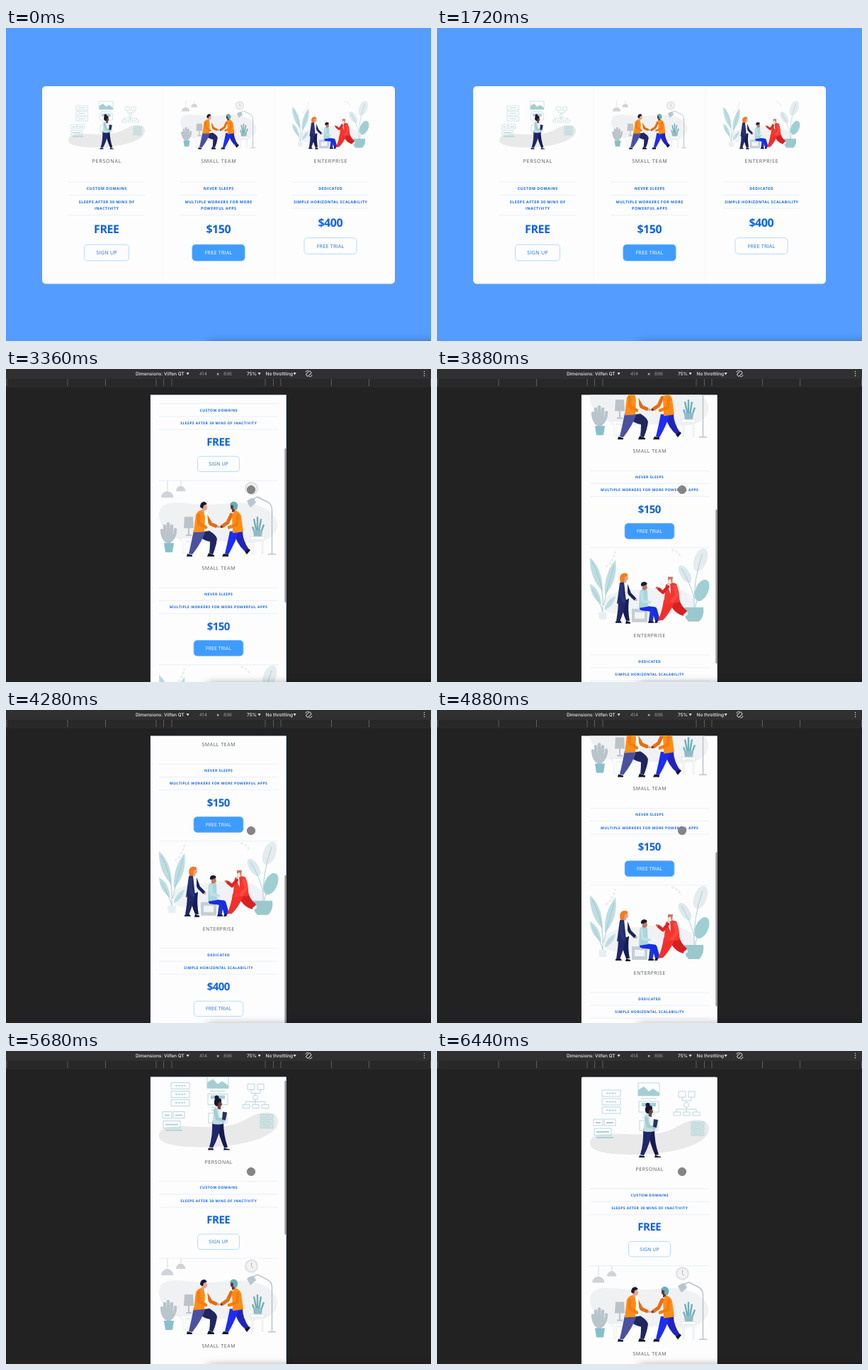
These frames come from a looping animation (600 px wide and 441 px high, 6480 ms). An HTML page:

```html
<!DOCTYPE html>
<html lang="en">
<head>
<meta charset="utf-8">
<title>Responsive pricing plans</title>
<style>
  html, body { margin: 0; width: 100%; height: 100%; overflow: hidden; }
  svg { display: block; width: 600px; height: 441px; }
  text { font-family: "Open Sans", sans-serif; text-rendering: geometricPrecision; }
  .bar text { font-family: Inter, sans-serif; font-size: 6.5px; font-weight: 500; fill: #eee; }
  .bar .dim { fill: #9a9a9a; font-weight: 400; }
  .limb { fill: none; stroke-linecap: round; stroke-linejoin: round; }
  .wire { fill: none; stroke: #a9cfd3; stroke-width: .8; }
</style>
</head>
<body>
<svg viewBox="0 0 600 441">
  <defs>
    <clipPath id="screen"><rect x="203.800" y="36.500" width="192" height="405"/></clipPath>
    <filter id="blur" x="-20%" y="-200%" width="140%" height="500%"><feGaussianBlur stdDeviation="7"/></filter>

    <g id="art0">
      <path fill="#e9e9ea" d="M0 87C0 72 24 73 50 74C88 76 108 73 126 62C145 50 168 51 168 67C168 90 112 103 62 103C26 103 0 99 0 87"/>
      <g class="wire">
        <path d="M17 12h26v9h-26zM17 24h26v9h-26zM17 36h26v9h-26z"/>
        <path d="M23 16.500h14M23 28.500h14M23 40.500h14" stroke-width="1.600" stroke-dasharray="3 1"/>
        <path d="M68 2h30v18h-30zM69 28h28v15h-28zM70 55h26v14h-26zM72 24h22M74 47h18M74 50h12"/>
        <path d="M125 14h10v8h-10zM139 14h9v8h-9zM130 22v5h13v-5M136 27v3M122 43v-4h28v4M136 36v7"/>
        <circle cx="136" cy="33" r="3.500"/>
        <path d="M118 43h10v5h-10zM132 43h9v5h-9zM145 43h10v5h-10z"/>
        <path d="M5 53h13v9h-13zM20 53h16v9h-16zM6 66h24v10h-24z"/>
        <path d="M8 58h7M23 58h10M9 71h18M9 79h24" stroke-width="1.800"/>
        <path d="M143 57h18v5h-18zM143 64h18v5h-18zM143 71h18v5h-18z" fill="#d4e6e6"/>
        <path d="M146 59.500h12M146 66.500h12M146 73.500h12"/>
      </g>
      <path fill="#a4ced3" d="M68 20v-8l8-5 7 7 6-4 9 6v4zM73 30h20v5h-20z"/>
      <path fill="#151b4c" d="M80 67h11Q91 86 97 103l-5 1Q85 88 80 67"/>
      <path fill="#1e2769" d="M75 67h13Q85 88 76 104l-5-1Q76 86 75 67"/>
      <path fill="#141838" d="M70 104l7 1v2h-8zM92 104l8 2v1h-9z"/>
      <path fill="#bfdde1" d="M78 48Q83 44 88 48L91 70Q83 72 75 70z"/>
      <path fill="#e9f3f3" d="M83 46l5 1 3 17-6-2z"/>
      <path class="limb" stroke="#a5ccd3" stroke-width="4.500" d="M79 51L82 63 92 65"/>
      <path fill="#2a315e" d="M90 53l6 1-2 11-5-1z"/>
      <path fill="#6b4038" d="M82 39h6l1 4-2 3v4l-4-1z"/>
      <path fill="#171830" d="M78 41Q77 33 84 34Q89 34 88 39L84 40 83 45Q79 46 78 41"/>
      <circle cx="81.500" cy="33" r="3" fill="#171830"/>
    </g>

    <g id="art1">
      <path fill="#f0f1f3" d="M1 42C6 26 34 32 60 34C100 34 121 27 142 36C177 49 173 78 145 86C110 92 90 81 62 88C26 92-6 65 1 42"/>
      <path fill="none" stroke="#cdd1d5" stroke-width=".8" d="M12 0v15M31 0v7"/>
      <path fill="#d0d4d8" d="M3 24a8.700 9 0 0 1 17.400 0zM24 15a6.700 7.500 0 0 1 13.400 0z"/>
      <circle cx="130.500" cy="11" r="9.500" fill="#e1e2e4"/>
      <circle cx="130.500" cy="11" r="7" fill="#f3f3f4"/>
      <path stroke="#9ba0a6" stroke-width=".8" fill="none" d="M130.500 6v5l2 3"/>
      <path fill="none" stroke="#b9c2c9" stroke-width="1.500" d="M159.500 104V42Q160 34 153 30L139 23 132 27"/>
      <path fill="#b9c6ce" d="M124 29q5-5 10-4l3 6-8 7zM154 103h11v1.500h-11z"/>
      <path fill="none" stroke="#b9c4cb" stroke-width="4.500" stroke-linecap="round" d="M13 88V61M12 86Q5 83 4 70M15 86Q23 80 23 69M9 82L8 64M17 80L18 64"/>
      <path fill="#87bfca" d="M7 88h14l-2 13h-10z"/>
      <path fill="#bbc3c9" d="M36 51h12l1 16h-14zM41 67h2v10h-2zM38 76h8v2h-8z"/>
      <path fill="#fff" stroke="#e4e6e9" stroke-width=".7" d="M31 81h21v4h-4v17h-3v-17h-8v17h-3v-17h-3z"/>
      <path fill="none" stroke="#71aeb8" stroke-width="2.400" d="M139 78L134 54M139 78L139 51M140 78L144 54M137 78L132 65M142 78L148 62"/>
      <path fill="#8fbcc6" d="M133 70h13l-1 9h-11z"/>
      <path fill="#fff" stroke="#dce0e3" stroke-width=".7" d="M129 79h20v4h-2v20h-2v-20h-12v20h-2v-20h-2z"/>

      <path fill="#20265f" d="M55 70L68 69Q81 76 82 82Q81 92 76 104L71 102Q72 94 72 86Q61 84 55 76z"/>
      <path fill="#4a51a0" d="M49 70L66 70Q60 88 47 104L42 103Q46 86 49 70"/>
      <path fill="#11152d" d="M40 103l7 2v2h-8zM70 102l8 3v2h-10z"/>
      <path class="limb" stroke="#e46c11" stroke-width="5" d="M66 49L73 61 80 64"/>
      <path fill="#fff" d="M60 42l8 2 2 27-11 1z"/>
      <path fill="#ff8d17" d="M52 48Q57 40 63 42L65 52 64 72 49 73z"/>
      <path class="limb" stroke="#f47d0c" stroke-width="4.500" d="M56 48L56 60 66 66"/>
      <path fill="#e6a38b" d="M61 34h6l1 5-2 3h-2v3l-4-2z"/>
      <path fill="#151a31" d="M58 36Q59 29 65 30L68 33 63 35 62 39Q58 39 58 36"/>
      <circle cx="84" cy="65" r="1.700" fill="#e6a38b"/>

      <path fill="#2024bc" d="M105 71L118 71Q118 84 127 97L123 101Q110 91 105 71"/>
      <path fill="#1d2df3" d="M100 71L113 71Q107 89 98 104L93 103Q97 87 100 71"/>
      <path fill="#13162c" d="M91 103l7 1v3h-9zM121 100l6-4 2 2-5 6z"/>
      <path fill="#fff" d="M99 43h8l2 29-9-1z"/>
      <path class="limb" stroke="#e96d10" stroke-width="5" d="M102 48L97 59 90 64"/>
      <path fill="#ff8d17" d="M106 42Q113 42 116 50L119 72 104 74 103 51z"/>
      <path class="limb" stroke="#f47d0c" stroke-width="4.500" d="M111 49L110 62 99 66"/>
      <path fill="#603b3a" d="M101 33h7l-1 10-4 2v-4l-2-2z"/>
      <path fill="#68adb5" d="M100 34Q102 28 108 30Q114 34 109 42L105 40V35z"/>
      <circle cx="88" cy="65" r="1.700" fill="#603b3a"/>
    </g>

    <g id="art2">
      <path fill="#f0f2f5" d="M20 83C18 64 39 60 69 59C104 53 142 56 148 76C155 97 121 93 82 93C50 94 21 97 20 83"/>
      <path fill="#bddde2" d="M18 62Q-1 42 0 14Q18 30 18 62M21 67Q19 38 36 17Q40 46 21 67M16 80Q1 70 0 51Q14 58 16 80M20 88Q24 73 36 68Q34 82 20 88"/>
      <path fill="none" stroke="#94c3ca" stroke-width=".8" d="M18 93V70Q16 44 3 20M19 81Q25 54 34 25M18 90Q11 70 3 58"/>
      <path fill="#e6f0f2" d="M12 91h12l-1 10h-10z"/>
      <path fill="none" stroke="#eceff1" stroke-width="3" stroke-dasharray="4 2" d="M22 27Q31 24 36 5M115 3Q123 3 129 14"/>
      <ellipse cx="156" cy="17" rx="9" ry="17" fill="#e4ecee" transform="rotate(20 156 17)"/>
      <ellipse cx="134" cy="37" rx="6.500" ry="14" fill="#dce9ec" transform="rotate(-32 134 37)"/>
      <ellipse cx="158" cy="60" rx="9" ry="16" fill="#9fcfd2" transform="rotate(24 158 60)"/>
      <path fill="none" stroke="#a3cbd0" stroke-width=".9" d="M147 89Q145 46 159 8M148 88Q150 70 162 52M147 72Q142 50 129 29"/>
      <path fill="#9ac8cd" d="M133 84h27Q162 96 154 104h-15Q131 96 133 84"/>
      <path fill="#c5ced4" d="M59 86h22v19h-22z"/>
      <path fill="#f2f4f6" d="M63 91h14v9h-14z"/>

      <path fill="#151c58" d="M44 72h11Q53 88 56 103h-5Q45 90 44 72"/>
      <path fill="#202867" d="M40 72h12Q48 90 42 104h-5Q40 88 40 72"/>
      <path fill="#111630" d="M36 104l7-1 2 3h-9zM51 103l6 2v2h-7z"/>
      <path class="limb" stroke="#1a235f" stroke-width="4.500" d="M51 52L56 65 63 72"/>
      <path fill="#fff" d="M46 47l7 2v24h-5z"/>
      <path fill="#222c6e" d="M42 50Q45 45 48 48L51 76 38 79z"/>
      <path class="limb" stroke="#2b357b" stroke-width="4" d="M45 53L44 67 48 76"/>
      <path fill="#e6a18b" d="M47 39h6l1 5-3 3v3l-5-2z"/>
      <path fill="#f47c20" d="M43 49Q40 38 47 36Q54 35 53 40L49 41 48 49z"/>
      <circle cx="65" cy="73.500" r="1.600" fill="#e6a18b"/>

      <path class="limb" stroke="#2435c6" stroke-width="6" d="M73 85L88 87 86 102"/>
      <path class="limb" stroke="#152ee4" stroke-width="7" d="M74 85L91 87 95 101"/>
      <path fill="#10162d" d="M93 102l6 1v3h-8zM83 103l7 1v2h-8z"/>
      <path fill="#a9d6dc" d="M70 62Q75 55 81 60L82 83 69 85z"/>
      <path class="limb" stroke="#bee1e5" stroke-width="4" d="M73 63L74 75 84 77"/>
      <path fill="#bf7860" d="M74 52h6l1 5-3 3-4-1z"/>
      <path fill="#171a35" d="M72 54Q71 48 77 48Q82 49 80 52L75 54z"/>

      <path fill="#d91f20" d="M111 75L126 72Q128 82 137 89L132 96Q118 93 111 75"/>
      <path fill="#f22f2b" d="M104 74L120 75Q113 93 101 104L96 102Q102 90 104 74"/>
      <path fill="#fff" d="M96 103l6-1 1 4h-8zM132 94l5-4 1 4-5 4z"/>
      <path fill="#f53630" d="M107 52Q115 47 122 51Q127 63 126 77L104 80z"/>
      <path fill="#fff" d="M109 52l4-2 1 15-2-4z"/>
      <path class="limb" stroke="#de2424" stroke-width="4.500" d="M110 55L103 63 97 58"/>
      <path class="limb" stroke="#ff4940" stroke-width="4.500" d="M120 55L123 67 116 75"/>
      <path fill="#c9765d" d="M110 41h7l-1 9-4 2-2-4z"/>
      <path fill="#eee8e3" d="M110 46l4-2 1 6-4 2z"/>
      <circle cx="94.500" cy="56.500" r="1.700" fill="#c9765d"/>
    </g>
  </defs>

  <g id="desktop">
    <rect width="600" height="441" fill="#549cff"/>
    <rect x="51" y="82" width="498" height="278.500" rx="5" fill="#fdfdfe"/>
    <path d="M221 82v278M379 82v278" stroke="#f3f4f7"/>
  </g>

  <g id="mobile">
    <rect width="600" height="441" fill="#222"/>
    <g clip-path="url(#screen)">
      <g id="page">
        <rect x="203.800" y="36.500" width="192" height="797.500" fill="#549cff"/>
        <rect x="203.800" y="36.500" width="192" height="797.500" rx="3" fill="#fdfdfe"/>
      </g>
      <rect id="thumb" x="393.500" width="2.300" height="217" rx="1" fill="#8b8b8b"/>
    </g>
    <circle cx="346" cy="170" r="5.600" fill="#858585" stroke="#707070" stroke-width=".8"/>
    <g class="bar">
      <rect width="600" height="13.500" fill="#303030"/>
      <rect y="13.500" width="600" height="11.500" fill="#282828"/>
      <path id="ticks" stroke="#5d5d5d"/>
      <path d="M0 13.500h600M0 25h600" stroke="#363636" stroke-width=".6"/>
      <text x="183" y="9">Dimensions: Vilfen QT</text>
      <text x="273" y="9" class="dim">414</text>
      <text x="297" y="9">×</text>
      <text x="307" y="9" class="dim">896</text>
      <text x="340" y="9">75%</text>
      <text x="366.500" y="9">No throttling</text>
      <path id="arrows" fill="#ddd"/>
      <g fill="none" stroke="#c8c8c8">
        <rect x="425.300" y="2.800" width="4" height="7.500" rx=".7" transform="rotate(45 427.300 6.500)"/>
        <path d="M423 5q0-3 4-3M432 8q0 3-4 3"/>
      </g>
      <path d="M590.500 3.600h.01M590.500 6.600h.01M590.500 9.600h.01" stroke="#ddd" stroke-width="1.500" stroke-linecap="round"/>
    </g>
  </g>
  <rect x="285" y="445" width="345" height="30" filter="url(#blur)" opacity=".55"/>
</svg>

<script>
const $ = id => document.getElementById(id);
const BLUE = '#0d62e6', BUTTON = '#3f9cff';

const plans = [
  { name: 'PERSONAL', features: ['CUSTOM DOMAINS', 'SLEEPS AFTER 30 MINS OF|INACTIVITY'], price: 'FREE', action: 'SIGN UP' },
  { name: 'SMALL TEAM', features: ['NEVER SLEEPS', 'MULTIPLE WORKERS FOR MORE|POWERFUL APPS'], price: '$150', action: 'FREE TRIAL', filled: true },
  { name: 'ENTERPRISE', features: ['DEDICATED', 'SIMPLE HORIZONTAL SCALABILITY'], price: '$400', action: 'FREE TRIAL' }
];

// Type entries are [size, letter spacing].
const wide = {
  scale: .643, half: 54, title: 85.5, rule: 115, row: 18.5, wrap: true,
  name: [7.2, .7], feature: [5.3, .52], price: [16, -.5], label: [7.2, .22],
  priceGap: 20, buttonGap: 41.7, buttonHeight: 22.7, buttons: [63, 74]
};
const narrow = {
  scale: 1, half: 84, title: 123.5, rule: 151, row: 18.2, wrap: false,
  name: [7, .53], feature: [5, .47], price: [15, -.5], label: [6.8, .14],
  priceGap: 17.5, buttonGap: 38, buttonHeight: 21.5, buttons: [59, 69.5]
};

function label(str, cx, cy, [size, gap], fill, weight) {
  return `<text x="${cx + gap / 2}" y="${cy + size * .36}" text-anchor="middle" font-size="${size}"
    letter-spacing="${gap}" font-weight="${weight}" fill="${fill}">${str}</text>`;
}

function drawPlan(plan, i, cx, top, m) {
  const left = cx - m.half;
  const rule = y => `<path d="M${left} ${y}h${m.half * 2}" stroke="#e3ecf8" stroke-width=".8"/>`;
  let y = top + m.rule;
  let out = `<use href="#art${i}" transform="translate(${left} ${top}) scale(${m.scale})"/>`
    + label(plan.name, cx, top + m.title, m.name, '#585b60', 500) + rule(y);

  for (const feature of plan.features) {
    const lines = m.wrap ? feature.split('|') : [feature.replace('|', ' ')];
    lines.forEach((line, n) => out += label(line, cx, y + m.row / 2 + n * 9, m.feature, BLUE, 700));
    y += m.row + (lines.length - 1) * 9.5;
    out += rule(y);
  }

  const width = m.buttons[plan.action === 'SIGN UP' ? 0 : 1], by = y + m.buttonGap;
  out += label(plan.price, cx, y + m.priceGap, m.price, BLUE, 700)
    + `<rect x="${cx - width / 2}" y="${by}" width="${width}" height="${m.buttonHeight}" rx="4.5"
        fill="${plan.filled ? BUTTON : '#fdfdfe'}" stroke="${plan.filled ? '#55a7ff' : '#add7f7'}" stroke-width=".9"/>`
    + label(plan.action, cx, by + m.buttonHeight / 2, m.label, plan.filled ? '#fff' : '#1f70dc', 500);
  if (!m.wrap && i < 2) out += rule(top + 259.5);
  return out;
}

const add = (id, html) => $(id).insertAdjacentHTML('beforeend', html);
plans.forEach((plan, i) => {
  add('desktop', drawPlan(plan, i, 142 + i * 158, 102, wide));
  add('page', drawPlan(plan, i, 300, 43 + i * 259.5, narrow));
});

$('ticks').setAttribute('d', [1, 87, 140.5, 212, 222.5, 234, 366, 377.5, 388, 459.5, 512.5, 599.5]
  .map(x => `M${x} 14v10`).join(''));
$('arrows').setAttribute('d', [254.5, 355.5, 405.5].map(x => `M${x} 5h4.200l-2.100 3.600z`).join(''));

// Scroll offset: [ms, px], joined by a monotone smooth curve.
const LOOP = 6480, RESIZE = 1960;
const stops = [[2800, 0], [3360, 145], [3880, 310], [4400, 382], [4700, 382], [4880, 315.5], [5320, 118], [5800, 0]];
const rate = i => stops[i + 1] ? (stops[i + 1][1] - stops[i][1]) / (stops[i + 1][0] - stops[i][0]) : 0;
const slope = i => {
  const a = i ? rate(i - 1) : 0, b = rate(i);
  return a * b > 0 ? (a + b) / 2 : 0;
};

function scrollAt(t) {
  const i = stops.findIndex((s, n) => n < stops.length - 1 && t >= s[0] && t < stops[n + 1][0]);
  if (i < 0) return 0;
  const [t0, a] = stops[i], [t1, b] = stops[i + 1], d = t1 - t0, u = (t - t0) / d;
  return a + (b - a) * u * u * (3 - 2 * u)
    + d * u * (1 - u) * (slope(i) * (1 - u) - slope(i + 1) * u);
}

function frame() {
  const t = performance.now() % LOOP, y = scrollAt(t);
  $('mobile').style.display = t < RESIZE ? 'none' : '';
  $('page').setAttribute('transform', `translate(0 ${-y})`);
  $('thumb').setAttribute('y', 36.3 + y * .521);
  $('thumb').setAttribute('opacity', t < 2800 ? 0 : Math.min(1, Math.max(0, (6440 - t) / 140)));
  requestAnimationFrame(frame);
}
frame();
</script>
</body>
</html>
```
